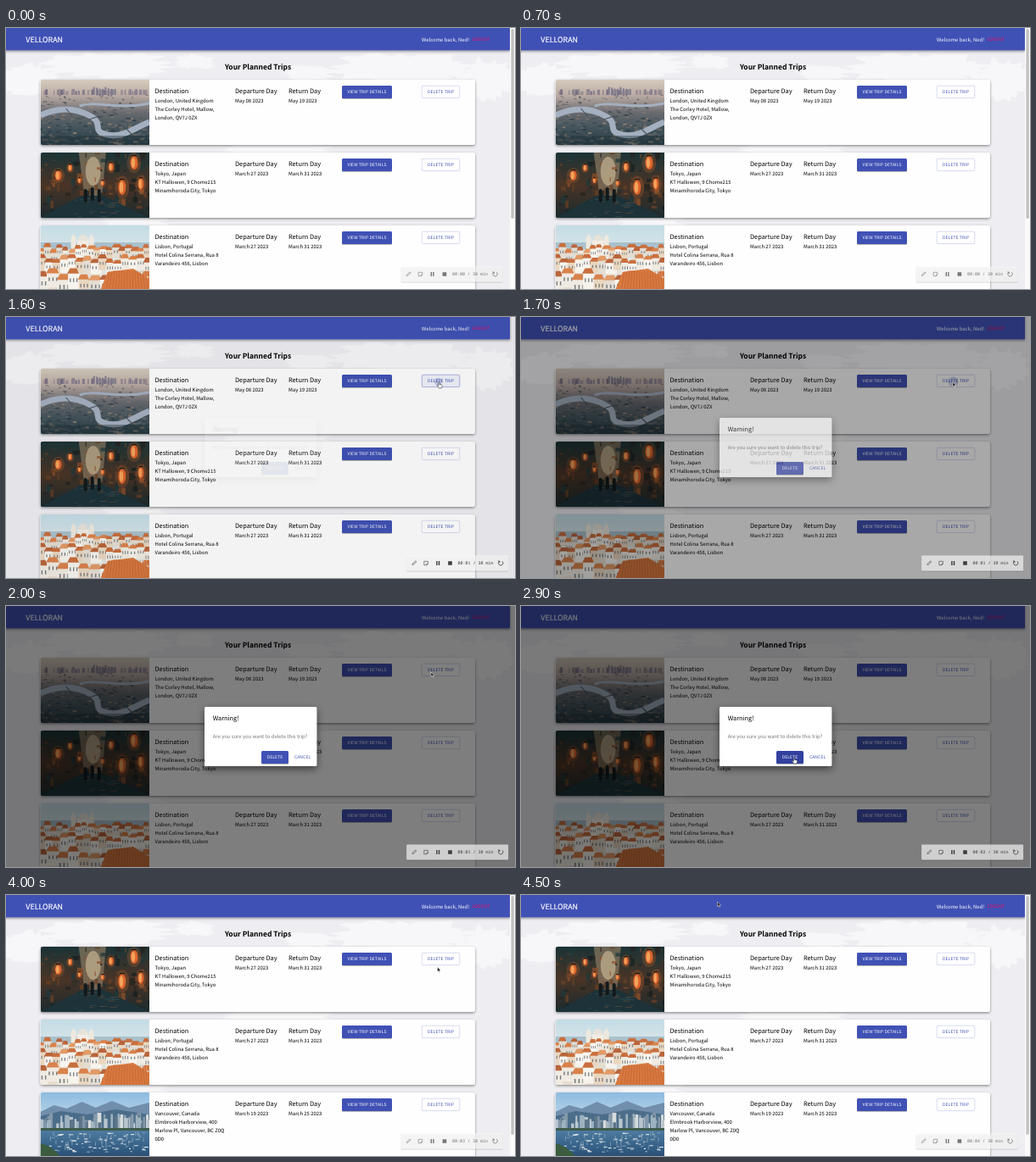
Animation of 600 by 308 pixels, one loop 4.6 s. Source, as an HTML page:

```html
<!DOCTYPE html>
<html lang="en">
<head>
<meta charset="utf-8">
<title>Planned trips</title>
<style>
html, body { margin: 0; width: 100%; height: 100%; overflow: hidden; background: #eeedf1; }
svg { display: block; width: 100vw; height: 100vh; }
text { font-family: "Noto Sans CJK JP", "Noto Sans CJK SC", "Noto Sans CJK", "Noto Sans", sans-serif; text-rendering: geometricPrecision; white-space: pre; }
.caps { font-size: 5px; letter-spacing: .12px; }
.mono { font-family: "Noto Sans Mono", "DejaVu Sans Mono", monospace; }
</style>
</head>
<body>
<svg id="stage" viewBox="0 0 600 308"></svg>
<script>
const BLUE = '#3f51b5', LOOP = 4600, STEP = 100, PITCH = 86;

let seed = 7;
const rnd = (a = 0, b = 1) => {
  seed = (seed * 16807) % 2147483647;
  return a + (b - a) * seed / 2147483647;
};
const pick = list => list[Math.floor(rnd(0, list.length))];
const many = (n, fn) => Array.from({ length: n }, (_, i) => fn(i)).join('');
const f = v => +v.toFixed(1);

const rect = (x, y, w, h, fill, more = '') =>
  `<rect x="${f(x)}" y="${f(y)}" width="${f(w)}" height="${f(h)}" fill="${fill}" ${more}/>`;
const path = (d, fill, more = '') => `<path d="${d}" fill="${fill}" ${more}/>`;
const oval = (x, y, rx, ry, fill, more = '') =>
  `<ellipse cx="${f(x)}" cy="${f(y)}" rx="${f(rx)}" ry="${f(ry)}" fill="${fill}" ${more}/>`;
const text = (x, y, size, str, more = '') =>
  `<text x="${x}" y="${y}" font-size="${size}" ${more}>${str}</text>`;
const caps = (x, y, str, fill, more = '') =>
  `<text class="caps" x="${x}" y="${y}" fill="${fill}" ${more}>${str}</text>`;
const gradient = (id, ...stops) =>
  `<linearGradient id="${id}" x2="0" y2="1">${stops.map((c, i) =>
    `<stop offset="${i / (stops.length - 1)}" stop-color="${c}"/>`).join('')}</linearGradient>`;
const shadow = (id, dy, blur, alpha) =>
  `<filter id="${id}" x="-20%" y="-40%" width="140%" height="190%">
    <feDropShadow dx="0" dy="${dy}" stdDeviation="${blur}" flood-opacity="${alpha}"/></filter>`;

// Photos, each drawn in a 128 x 77 box
function riverCity() {
  const river = (d, w) => path(d, 'none', `stroke="#a4b0c0" stroke-width="${w}"`);
  return rect(0, 0, 128, 77, 'url(#dusk)') +
    many(60, () => {
      const h = rnd(1, 4);
      return rect(rnd(0, 128), 15 - h, rnd(1, 3), h + 3, pick(['#8b8492', '#9b8f94', '#776f80']));
    }) +
    many(7, i => rect(62 + i * 3.4, rnd(7, 11), 2, 9, '#827c8e')) +
    many(330, () => {
      const y = 17 + 60 * rnd() ** .8, s = .8 + y / 32;
      return rect(rnd(-2, 128), y, rnd(1, 2.4) * s, rnd(.4, 1) * s,
        pick(['#34434c', '#4d5459', '#776d69', '#293a43', '#a08a78', '#5f666c']), 'opacity=".7"');
    }) +
    river('M46 31C66 24 90 36 128 28', 3) +
    river('M0 42C24 31 43 34 59 43C76 53 58 60 79 65C98 69 114 55 128 50', 7) +
    path('M30 34L37 42M57 47L69 43M100 57L109 66', 'none', 'stroke="#4b535b" stroke-width="1.1"') +
    rect(0, 66, 128, 11, '#1d2f36', 'opacity=".4"');
}

function lanternAlley() {
  const lantern = (x, y, rx, ry) =>
    oval(x, y, rx * 1.9, ry * 1.5, '#d06a2c', 'opacity=".25"') +
    oval(x, y, rx, ry, '#dc632c') + oval(x - rx * .2, y, rx * .5, ry * .75, '#f3a35c') +
    rect(x - rx * .6, y - ry - 1, rx * 1.2, 1.2, '#1a1814');
  return rect(0, 0, 128, 77, 'url(#night)') +
    path('M45 0H77L73 46L63 58L51 45Z', '#8b7962', 'opacity=".7"') +
    oval(62, 22, 9, 17, '#dcc9a4', 'opacity=".55"') +
    many(110, () => rect(rnd(0, 128), rnd(0, 68), rnd(1, 7), rnd(1, 9),
      pick(['#142023', '#35302a', '#674026', '#1c393d', '#8d512d', '#24231f']), 'opacity=".75"')) +
    path('M0 77L48 51H74L128 77Z', '#1d3239') +
    many(24, () => rect(rnd(38, 88), rnd(53, 76), rnd(2, 9), .6, pick(['#4b6b70', '#a0623c']), 'opacity=".6"')) +
    lantern(110, 12, 4.5, 8) + lantern(96, 41, 4.5, 9) + lantern(83, 17, 3, 5) +
    lantern(21, 27, 4, 6) + lantern(35, 18, 2.5, 4) + lantern(118, 37, 3.5, 7) +
    lantern(46, 33, 2, 3) + lantern(73, 36, 2, 3) +
    many(3, i => rect(51 + i * 8, 43 - i % 2 * 2, 4, 16, '#11191c', 'rx="2"'));
}

function roofTown() {
  const house = (x, y, w, h) =>
    rect(x, y, w, h, pick(['#f0ebe2', '#e4ddd2', '#f7f4ee', '#e9d6bf'])) +
    path(`M${f(x - 1)} ${f(y)}l${f(w * .25)} ${f(-h * .35)}h${f(w * .6)}l${f(w * .2)} ${f(h * .35)}z`,
      pick(['#d9824c', '#c96f3e', '#e29a66', '#b9653c'])) +
    many(3, i => rect(x + w * (.15 + i * .3), y + h * .3, w * .1, h * .25, '#777c80'));
  return rect(0, 0, 128, 77, 'url(#pale)') +
    rect(0, 20, 128, 8, '#a9c0cb') +
    path('M36 28V15L39 10L42 15V28ZM57 28V15L60 10L63 15V28Z', '#eee9df') +
    oval(50, 18, 6, 7, '#e8e3da') + rect(43, 18, 14, 14, '#f1ede5') +
    many(18, i => house(i * 7.3 - 3, rnd(24, 33), rnd(7, 12), rnd(10, 15))) +
    many(15, i => house(i * 9 - 4, rnd(38, 46), rnd(9, 14), rnd(12, 17))) +
    many(11, i => house(i * 12.5 - 5, rnd(56, 65), rnd(11, 17), rnd(15, 20))) +
    path('M70 77L79 55L109 51L128 63V77Z', '#d8793f') +
    many(16, i => path(`M${81 + i * 3} 54l${f((i - 7) * .5)} 23`, 'none', 'stroke="#b85f34" stroke-width=".6"'));
}

function harbour() {
  return rect(0, 0, 128, 77, 'url(#sky)') +
    path('M0 23L16 15L31 19L49 11L65 18L84 10L104 18L128 12V40H0Z', '#718eac') +
    path('M0 28L24 22L55 26L88 20L128 26V42H0Z', '#4c6d8a') +
    many(65, () => {
      const h = rnd(7, 20);
      return rect(rnd(-1, 127), 44 - h, rnd(2, 5), h, pick(['#b9c6cf', '#8399aa', '#d7dcdc', '#5d7587', '#9db2bf']));
    }) +
    rect(0, 42, 128, 3, '#3e5c4c') + rect(0, 45, 128, 32, 'url(#sea)') +
    many(75, () => {
      const y = rnd(47, 70);
      return rect(rnd(8, 124), y, rnd(2, 5), rnd(.7, 1.5), pick(['#e9eef0', '#c4d0d8', '#81a0b6']));
    }) +
    many(34, () => {
      const x = rnd(10, 122), y = rnd(51, 69);
      return path(`M${f(x)} ${f(y)}v-5`, 'none', 'stroke="#dbe3e8" stroke-width=".4"');
    }) +
    path('M0 60Q14 63 25 77H0Z', '#3b5c3e');
}

const trips = [
  [riverCity, 'May 08 2023', 'May 19 2023',
    'London, United Kingdom', 'The Corley Hotel, Mallow,', 'London, QV7J 0ZX'],
  [lanternAlley, 'March 27 2023', 'March 31 2023',
    'Tokyo, Japan', 'KT Hallowen, 9 Chome215', 'Minamihoroda City, Tokyo'],
  [roofTown, 'March 27 2023', 'March 31 2023',
    'Lisbon, Portugal', 'Hotel Colina Serrana, Rua 8', 'Varandeiro 456, Lisbon'],
  [harbour, 'March 19 2023', 'March 25 2023',
    'Vancouver, Canada', 'Elmbrook Harborview, 400', 'Marlow Pl, Vancouver, BC Z0Q', '0D0']
];

const card = ([photo, from, to, ...place], i) => `<g transform="translate(0 ${61 + i * PITCH})">
  ${rect(40.5, 0, 512.5, 77, '#fefefe', 'rx="3" filter="url(#low)"')}
  <g clip-path="url(#round)"><svg x="40.5" width="128.5" height="77" viewBox="0 0 128 77"
    preserveAspectRatio="none">${photo()}</svg></g>
  ${text(175.5, 16, 7.4, 'Destination')}${text(270, 16, 7.4, 'Departure Day')}${text(333, 16, 7.4, 'Return Day')}
  ${place.map((s, n) => text(175.5, 27 + n * 10, 5.93, s)).join('')}
  ${text(270, 27, 5.93, from)}${text(333, 27, 5.93, to)}
  ${rect(396, 7, 59, 15, BLUE, 'rx="1.5" filter="url(#btn)"')}
  ${caps(425.5, 16.4, 'VIEW TRIP DETAILS', '#fff', 'text-anchor="middle"')}
  <rect ${i ? '' : 'id="trash"'} x="490.2" y="7.2" width="44.6" height="14.4" rx="1.5" fill="#fff"
    stroke="${BLUE}" stroke-opacity=".5" stroke-width=".4"/>
  ${caps(512.6, 16.4, 'DELETE TRIP', BLUE, 'text-anchor="middle"')}</g>`;

// Ragged land masses of the backdrop map
const land = (x, y, rx, ry) => path('M' + Array.from({ length: 46 }, (_, i) => {
  const a = i / 46 * Math.PI * 2, r = rnd(.72, 1.15);
  return f(x + rx * r * Math.cos(a)) + ' ' + f(y + ry * r * Math.sin(a));
}).join('L') + 'Z', '#f7f6f8');

const stage = document.getElementById('stage');
stage.innerHTML = `<defs>
  ${gradient('dusk', '#d5cbbd', '#b9a9a2', '#6a6b70', '#41525a', '#2c3e46')}
  ${gradient('night', '#1b3336', '#4a3426', '#1b2a2d')}
  ${gradient('pale', '#c4dce6', '#dfe8e8', '#e6dccd')}
  ${gradient('sky', '#8dbbe0', '#c7ddeb', '#c7ddeb')}
  ${gradient('sea', '#4d7ba0', '#274e75')}
  ${shadow('low', 1.2, 1.5, .45)}${shadow('btn', .7, .6, .4)}${shadow('high', 3.5, 5, .5)}
  <clipPath id="round"><rect x="40.5" width="512.5" height="77" rx="3"/></clipPath></defs>
  ${rect(0, 0, 600, 308, '#eeedf1')}
  ${land(122, 44, 78, 15)}${land(28, 62, 38, 20)}${land(222, 40, 24, 9)}${land(470, 48, 88, 18)}
  ${land(565, 62, 34, 26)}${land(355, 54, 30, 10)}${land(320, 143, 60, 13)}${land(150, 228, 40, 14)}
  ${rect(-5, -5, 599, 31.3, BLUE, 'filter="url(#low)"')}
  ${text(23.3, 16.5, 8.9, 'VELLORAN', 'fill="#fff" stroke="#fff" stroke-width=".15"')}
  ${text(490, 15.5, 5.93, 'Welcome back, Ned!', 'fill="#fff"')}
  ${caps(549.5, 15.3, 'LOGOUT', '#f50057')}
  ${text(297, 49, 8.5, 'Your Planned Trips', 'font-weight="700" text-anchor="middle"')}
  <g id="cards">${trips.map(card).join('')}</g>
  <circle id="ripple" cx="509.5" cy="76.5" fill="${BLUE}" opacity=".25"/>
  <g id="bar">${rect(594, 0, 6, 308, '#fafafa')}<rect id="thumb" x="595.4" y="1" width="3.4" rx="1.7" fill="#c1c1c1"/></g>
  <rect id="shade" width="600" height="308"/>
  <g id="dialog">${rect(234, 119, 132.3, 70, '#fff', 'rx="1.5" filter="url(#high)"')}
    ${text(243.7, 134.7, 7.4, 'Warning!')}
    ${text(243.7, 156, 5.93, 'Are you sure you want to delete this trip?', 'fill="#757575"')}
    <rect id="confirm" x="301" y="171" width="32" height="15" rx="1.5" filter="url(#btn)"/>
    ${caps(317, 180.4, 'DELETE', '#fff', 'text-anchor="middle"')}
    ${caps(349.6, 180.4, 'CANCEL', BLUE, 'text-anchor="middle"')}</g>
  <g id="tools">${rect(465.5, 281.5, 120, 18, '#fff', 'rx="1" fill-opacity=".62" filter="url(#btn)"')}
    <g fill="none" stroke="currentColor" stroke-width=".6">
      <path d="M472.3 292.5l.5-1.6 3.4-3 1 1.1-3.3 3zM486.2 288.3h4.6v3l-1.5 1.5h-3.1zM490.8 291.3h-1.5v1.5"/>
      <path d="M578.4 288.3a2.7 2.7 0 1 1-3.6 0M573.3 288h2v2" stroke-width=".8"/></g>
    <path d="M500.6 288h1.4v5h-1.4zM503.2 288h1.4v5h-1.4zM514.6 288.2h4.6v4.6h-4.6z" fill="currentColor"/>
    <text id="clock" class="mono" x="526" y="292.4" font-size="5" fill="currentColor"></text></g>
  <g id="cursor" stroke="#fff" stroke-width=".5" stroke-linejoin="round">
    <path id="arrow" d="M0 0V5.4L1.3 4.3L2.1 6.2L3 5.8L2.2 3.9H3.8Z" fill="#111"/>
    <path id="hand" d="M-.6 .5q.6 -.9 1.2 0V3l2.6 .6q.7 .3 .5 1.2L3 7.4H-.4L-2.2 4.8q-.2 -1 .7 -.7l.9 .7Z"
      fill="#fff" stroke="#111"/></g>`;

const el = {};
stage.querySelectorAll('g[id],rect[id],circle[id],path[id],text[id]').forEach(n => el[n.id] = n);
const set = (n, attrs) => { for (const k in attrs) n.setAttribute(k, attrs[k]); };
const show = (n, on) => set(n, { visibility: on ? 'visible' : 'hidden' });
const smooth = p => (p = Math.min(1, Math.max(0, p)), p * p * (3 - 2 * p));

// Pointer stops: time, x, y
const route = [
  [900, 578, 296], [1350, 513, 79], [1600, 510.5, 76.5], [2000, 501, 78], [2150, 492, 84],
  [2600, 322, 178.5], [2900, 322, 178.5], [3300, 583, 152], [3600, 604, 148],
  [3800, 604, 110], [4400, 236, 14], [4500, 231.5, 8], [4600, 231.5, 8]
];
function pointer(t) {
  const i = Math.max(1, route.findIndex(p => p[0] > t));
  const [a, b] = [route[i - 1], route[i]], p = smooth((t - a[0]) / (b[0] - a[0]));
  return [a[1] + (b[1] - a[1]) * p, a[2] + (b[2] - a[2]) * p];
}

function draw(t) {
  const open = smooth((t - 1560) / 225) - smooth((t - 2950) / 195);
  const locked = t >= 1600 && t < 3200, deleted = t >= 3300;
  set(el.shade, { opacity: open / 2 });
  set(el.dialog, { opacity: open });
  show(el.bar, !locked);
  set(el.thumb, { height: deleted ? 282 : 224 });
  set(el.cards, { transform: `translate(0 ${deleted ? -PITCH : 0})` });
  show(el.cards.firstElementChild, !deleted);

  const [x, y] = pointer(t);
  const onTrash = t < 1700 && x > 490 && x < 535 && y > 68 && y < 83;
  const onConfirm = t > 2200 && t < 3000 && x > 301 && x < 333 && y > 171 && y < 186;
  const hand = onTrash || onConfirm;
  set(el.trash, { fill: onTrash ? '#eff1fa' : '#fff', 'stroke-opacity': onTrash ? 1 : .5 });
  set(el.confirm, { fill: onConfirm ? '#303f9f' : BLUE });
  set(el.ripple, { r: t >= 1500 && t < 1800 ? 3 + 3 * smooth((t - 1500) / 200) : 0 });
  show(el.cursor, t >= 900);
  set(el.cursor, { transform: `translate(${x} ${y})` });
  set(el.arrow, { opacity: hand ? 0 : 1 });
  set(el.hand, { opacity: hand ? 1 : 0 });

  set(el.tools, { transform: `translate(${locked ? 6.6 : 0} 0)`, color: locked ? '#3c3c3c' : '#777' });
  el.clock.textContent = `00:0${Math.max(0, Math.floor((t - 100) / 1000))} / 30 min`;
}

const start = performance.now();
function tick() {
  const t = (performance.now() - start) % LOOP;
  draw(Math.floor(t / STEP) * STEP);
  requestAnimationFrame(tick);
}
tick();
</script>
</body>
</html>
```
